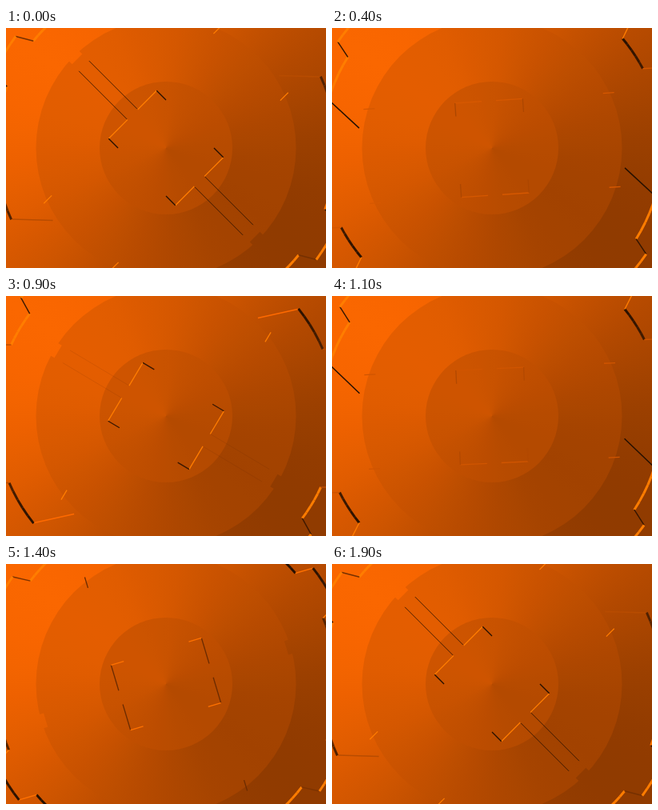
An HTML page with a canvas that plays this animation: 400 by 300 pixels, repeating every 2000 ms.

```html
<!DOCTYPE html>
<html>
<head>
<meta charset="utf-8">
<style>
html, body { margin: 0; width: 100%; height: 100%; overflow: hidden; background: #c45000; }
canvas { display: block; width: 400px; height: 300px; }
</style>
</head>
<body>
<canvas id="stage" width="400" height="300"></canvas>
<script>
const ctx = document.getElementById('stage').getContext('2d');
const CX = 200, CY = 150, RAD = Math.PI / 180;
const LIGHT_ANGLE = 216 * RAD;
let turn = 0;

const orange = level => `rgb(${Math.min(255, level)}, ${Math.min(125, level * 0.41)}, 0)`;

// Cone shading: brightest where the surface faces the light.
function shade(mid, swing) {
  const gradient = ctx.createConicGradient(LIGHT_ANGLE, CX, CY);
  for (let i = 0; i <= 36; i++) {
    gradient.addColorStop(i / 36, orange(mid + swing * Math.cos(i / 36 * 2 * Math.PI)));
  }
  return gradient;
}
const outerShade = shade(197, 53);
const ringShade = shade(195, 33);
const hubShade = shade(193, 13);

function disc(radius, fill) {
  ctx.fillStyle = fill;
  ctx.beginPath();
  ctx.arc(CX, CY, radius, 0, 2 * Math.PI);
  ctx.fill();
}

function place(x, y) {
  const c = Math.cos(turn), s = Math.sin(turn);
  return [CX + x * c - y * s, CY + x * s + y * c];
}

const polar = (radius, degrees) =>
  [radius * Math.cos(degrees * RAD), radius * Math.sin(degrees * RAD)];

// An edge is dark along one diagonal, bright along the other and neutral
// when horizontal or vertical. Each is drawn with its half-turn twin.
function edge([x1, y1], [x2, y2], width, faint = false) {
  const tilt = Math.sin(2 * (Math.atan2(y2 - y1, x2 - x1) + turn));
  ctx.globalAlpha = faint ? tilt ** 16 * (tilt > 0 ? 0.8 : 0.2) : 1;
  ctx.strokeStyle = orange(193 - 155 * tilt);
  ctx.lineWidth = width;
  for (const side of [1, -1]) {
    ctx.beginPath();
    ctx.moveTo(...place(x1 * side, y1 * side));
    ctx.lineTo(...place(x2 * side, y2 * side));
    ctx.stroke();
  }
  ctx.globalAlpha = 1;
}

function rim(radius, from, to) {
  const parts = 5, step = (to - from) / parts;
  for (let i = 0; i < parts; i++) {
    edge(polar(radius, from + i * step), polar(radius, from + (i + 1) * step), 3);
  }
}

function slitNotches() {
  ctx.fillStyle = outerShade;
  for (const side of [1, -1]) {
    ctx.beginPath();
    for (const [x, y] of [[-9, 157], [9, 157], [9, 164], [-9, 164]]) {
      ctx.lineTo(...place(x * side, y * side));
    }
    ctx.fill();
  }
}

function hubEdges() {
  for (const s of [1, -1]) {
    edge([9 * s, 59], [42.4 * s, 59], 1.3);
    edge([42.4 * s, 59], [42.4 * s, 42.4], 1.3);
    edge([9 * s, 60], [9 * s, 145], 1, true);
    edge([143, 59 * s], [157, 59 * s], 1.3);
  }
}

function gearEdges() {
  for (const gap of [30, 60, 90, 120, 150]) {
    const start = gap === 30 ? 20.2 : gap - 6.1;
    rim(213, start, gap + 6.1);
    if (gap > 30) edge(polar(213, gap - 6.1), polar(234, gap - 8.4), 1.4);
    edge(polar(213, gap + 6.1), polar(234, gap + 8.4), 1.4);
  }
  for (const tooth of [45, 75, 105, 135]) rim(234, tooth - 6.6, tooth + 6.6);
  edge([164, 36], [199, 73], 1.5);
}

function draw(now) {
  const p = Math.floor(now % 2000 / 100) / 19;
  turn = (-45 + 360 * p * p * (3 - 2 * p)) * RAD;
  ctx.fillStyle = outerShade;
  ctx.fillRect(0, 0, 400, 300);
  disc(162.5, ringShade);
  slitNotches();
  disc(83, hubShade);
  hubEdges();
  gearEdges();
}

const began = performance.now();
function tick() {
  draw(performance.now() - began);
  requestAnimationFrame(tick);
}
tick();
</script>
</body>
</html>
```
